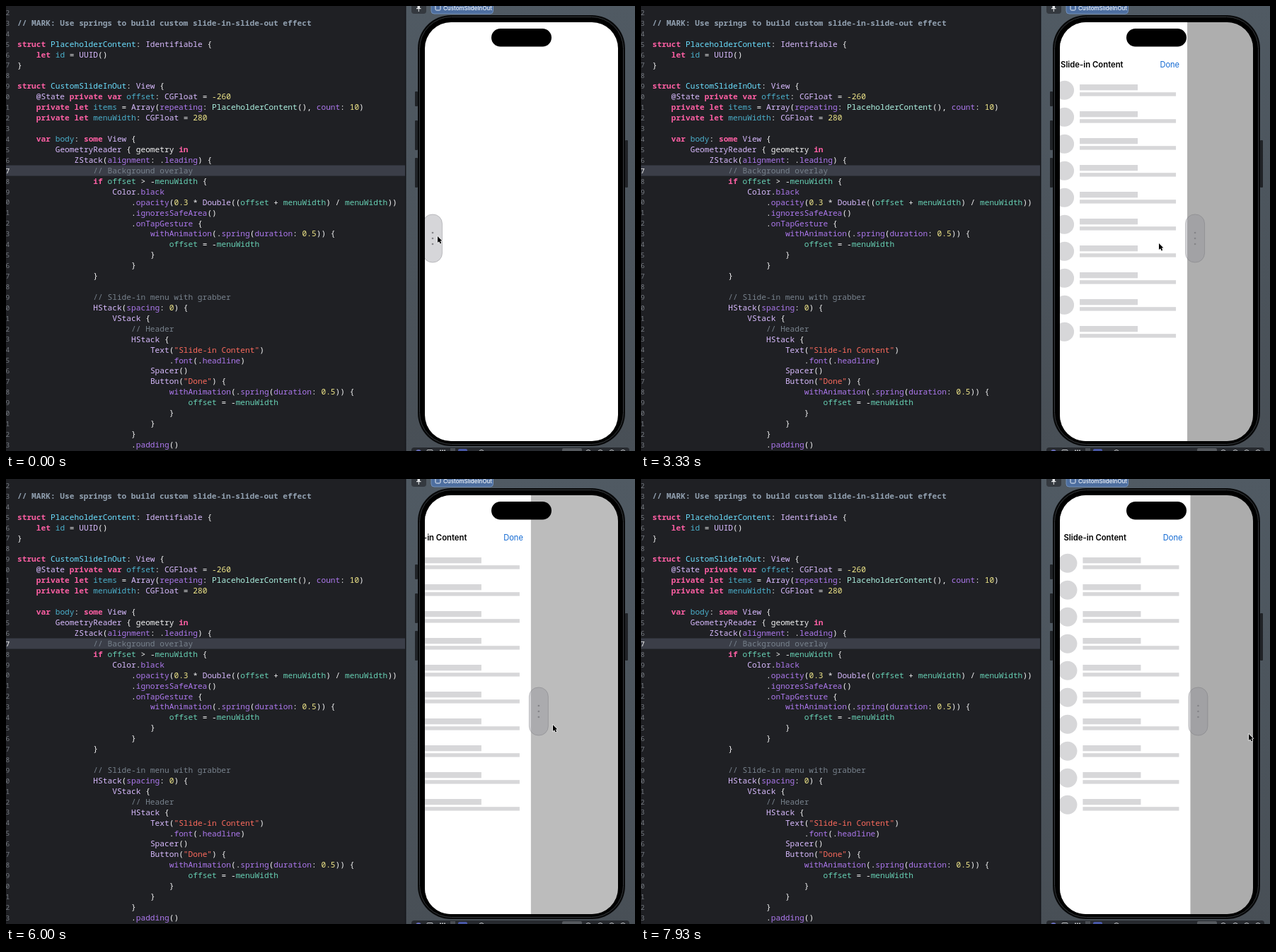
Animation, 889 px wide and 630 px high, one loop 8000 ms. Source, as an HTML page with a canvas:

```html
<!DOCTYPE html>
<html lang="en">
<head>
<meta charset="utf-8">
<title>Slide-in menu</title>
<style>
  html, body { margin: 0; width: 100%; height: 100%; overflow: hidden; background: #1f2024; }
  canvas { display: block; }
</style>
</head>
<body>
<canvas id="stage" width="889" height="630"></canvas>
<script>
const ctx = document.getElementById('stage').getContext('2d');
const LOOP = 8000, CLOSED = 592, OPEN = 782, OMEGA = 2 * Math.PI / 500;
const MONO = '"Noto Sans Mono", "DejaVu Sans Mono", monospace';
const SANS = 'Inter, Roboto, sans-serif';
const CHAR = 6.71, LINE = 14.925;

const code = `
// MARK: Use springs to build custom slide-in-slide-out effect

struct PlaceholderContent: Identifiable {
    let id = UUID()
}

struct CustomSlideInOut: View {
    @State private var offset: CGFloat = -260
    private let items = Array(repeating: PlaceholderContent(), count: 10)
    private let menuWidth: CGFloat = 280

    var body: some View {
        GeometryReader { geometry in
            ZStack(alignment: .leading) {
                // Background overlay
                if offset > -menuWidth {
                    Color.black
                        .opacity(0.3 * Double((offset + menuWidth) / menuWidth))
                        .ignoresSafeArea()
                        .onTapGesture {
                            withAnimation(.spring(duration: 0.5)) {
                                offset = -menuWidth
                            }
                        }
                }

                // Slide-in menu with grabber
                HStack(spacing: 0) {
                    VStack {
                        // Header
                        HStack {
                            Text("Slide-in Content")
                                .font(.headline)
                            Spacer()
                            Button("Done") {
                                withAnimation(.spring(duration: 0.5)) {
                                    offset = -menuWidth
                                }
                            }
                        }
                        .padding()`.split('\n');

// Syntax rules, first match wins: pattern, colour, weight
const rules = [
  [/\/\/ MARK.*/, '#92a1b1', 700],
  [/\/\/.*/, '#77818c', 500],
  [/"[^"]*"/, '#fc6a5d', 500],
  [/\b(?:struct|let|private|var|some|in|if)\b/, '#fc5fa3', 700],
  [/(?<=struct )\w+/, '#6bdfff', 500],
  [/(?<=(?:var|let) )\w+/, '#4bb0cc', 500],
  [/\b(?:offset|menuWidth)\b/, '#67d0b4', 500],
  [/-?\d[\d.]*/, '#f2e88a', 500],
  [/PlaceholderContent/, '#aef3e2', 500],
  [/@?[A-Z]\w*/, '#d9bbff', 500],
  [/withAnimation|(?<=\.)[a-z]\w*|[a-z]\w*(?=:)/, '#ad78ee', 500],
  [/[^\s\w]+?|\w+/, '#f4f4f5', 500]
];
const tokenizer = new RegExp(rules.map(r => `(${r[0].source})`).join('|'), 'g');

// Each cycle: drag start, release, tap on the overlay
const cycles = [[60, 500, 1770], [2650, 3060, 4283], [5480, 5920, 7910]];
// Pointer path: time, x, y
const path = [
  [60, 610, 326], [500, 730, 336], [1150, 821, 351], [1770, 821, 351],
  [2450, 610, 330], [2650, 610, 330], [3060, 732, 336], [3340, 732, 336],
  [4050, 828, 349], [4530, 828, 349], [5250, 610, 332], [5480, 610, 332],
  [5920, 745, 346], [6000, 773, 348], [6500, 835, 358], [6800, 835, 358],
  [7400, 859, 361]
];

const spring = ms => (1 + OMEGA * ms) * Math.exp(-OMEGA * ms);

function pointer(t) {
  const i = path.findIndex(p => p[0] > t);
  if (i === 0) return path[0].slice(1);
  if (i < 0) return path[path.length - 1].slice(1);
  const [a, b] = [path[i - 1], path[i]];
  const u = (t - a[0]) / (b[0] - a[0]), s = u * u * (3 - 2 * u);
  return [1, 2].map(k => a[k] + (b[k] - a[k]) * s);
}

const draggedEdge = t => CLOSED + pointer(t)[0] - 610;

function menuEdge(t) {
  const cycle = cycles.filter(c => c[0] <= t).pop();
  if (!cycle) return CLOSED;
  const [, release, tap] = cycle;
  if (t < release) return draggedEdge(t);
  if (t < tap) return OPEN - (OPEN - draggedEdge(release)) * spring(t - release);
  return CLOSED + (OPEN - CLOSED) * spring(t - tap);
}

function rect(x, y, w, h, color) {
  ctx.fillStyle = color;
  ctx.fillRect(x, y, w, h);
}

function round(x, y, w, h, r, fill, stroke) {
  ctx.beginPath();
  ctx.roundRect(x, y, w, h, r);
  if (fill) { ctx.fillStyle = fill; ctx.fill(); }
  if (stroke) { ctx.strokeStyle = stroke; ctx.lineWidth = 1; ctx.stroke(); }
}

function dot(x, y, r, color) {
  ctx.beginPath();
  ctx.arc(x, y, r, 0, 7);
  ctx.fillStyle = color;
  ctx.fill();
}

function text(str, x, y, font, color, align = 'left') {
  ctx.font = font;
  ctx.fillStyle = color;
  ctx.textAlign = align;
  ctx.fillText(str, x, y);
}

function drawEditor() {
  rect(0, 0, 564, 630, '#1f2024');
  rect(0, 225.5, 564, 15, '#3b3e48');
  code.forEach((line, i) => {
    const y = 13 + i * LINE, current = i === 15;
    text(i + 22, 5.2, y - 0.2, `500 9.5px ${MONO}`, current ? '#fff' : '#777b82', 'right');
    for (const m of line.matchAll(tokenizer)) {
      const [, color, weight] = rules[m.slice(1).findIndex(g => g !== undefined)];
      text(m[0], 16 + m.index * CHAR, y, `${weight} 11.18px ${MONO}`, color);
    }
  });
}

function drawPanel() {
  const shade = ctx.createLinearGradient(0, 0, 0, 630);
  shade.addColorStop(0, '#505a63');
  shade.addColorStop(1, '#484f56');
  rect(564, 0, 325, 630, shade);
  rect(564, 0, 1.5, 630, '#15161a');

  round(573, -10, 21, 21, 4, '#34393f');
  rect(581.5, 0, 3.5, 3, '#e4e6e8');
  rect(580, 3, 6.5, 1.2, '#e4e6e8');
  rect(582.8, 4, 1, 4, '#e4e6e8');
  round(601, -10, 87.5, 21, 4, '#4d6e9f', '#7190bb');
  round(607, -1.5, 7, 7.5, 1.5, null, '#edf2fa');
  text('CustomSlideInOut', 618, 6, `500 8px ${SANS}`, '#f4f7fc');

  round(573, 625, 308, 20, 4, '#272a2f');
  rect(628, 626, 7, 4, '#4a4e54');
  round(639, 627, 13, 9, 2, '#4857a5');
  round(786, 626, 28, 9, 2, '#55595e');
  dot(583, 632, 4, '#6a6fc0');
  round(595, 628.5, 8, 8, 1, null, '#c8cacd');
  for (let x = 613; x < 622; x += 3) rect(x, 628.5, 2, 2, '#b5b7ba');
  for (const x of [672, 823, 840, 856, 872]) round(x - 3.5, 628.5, 7, 7, 3.5, null, '#c8cacd');
}

function drawPhone() {
  for (const [x, y, h] of [[578, 121, 21], [578, 162, 42], [578, 215, 42], [875, 190, 67]])
    round(x, y, 4, h, 1, '#202327');
  round(582, 13, 293, 610, 47, '#08090a');
  round(584.5, 15.5, 288, 605, 45, '#000', '#35383b');
  round(592, 23, 273, 593, 37, '#fff');
}

function drawMenu(edge) {
  const gray = '#d7d7d9';
  rect(CLOSED, 22, edge - CLOSED, 595, '#fff');
  text('Slide-in Content', edge - 179, 87, `600 11.3px ${SANS}`, '#000');
  text('Done', edge - 11, 87, `400 11.1px ${SANS}`, '#1068d2', 'right');
  for (let i = 0; i < 10; i++) {
    const y = 119.3 + i * 38;
    dot(edge - 173.5, y, 13.5, gray);
    rect(edge - 152, y - 8.3, 82, 8.3, gray);
    rect(edge - 152, y + 2.9, 136, 5.4, gray);
  }
}

function drawGrabber(edge) {
  round(edge - 2.5, 295, 27, 68, 13, 'rgba(142,142,150,.36)', 'rgba(110,110,116,.35)');
  for (const y of [321, 329, 337]) dot(edge + 11, y, 1.35, '#858589');
}

function drawPointer(x, y) {
  const shape = [[0, 0], [0, 9], [2.1, 7.2], [3.6, 10.4], [5.2, 9.7], [3.8, 6.6], [6.4, 6.4]];
  ctx.beginPath();
  for (const [dx, dy] of shape) ctx.lineTo(x + dx, y + dy);
  ctx.closePath();
  ctx.lineJoin = 'round';
  ctx.lineWidth = 1.3;
  ctx.strokeStyle = '#fff';
  ctx.stroke();
  ctx.fillStyle = '#000';
  ctx.fill();
}

function draw(t) {
  const edge = menuEdge(t);
  drawEditor();
  drawPanel();
  drawPhone();
  ctx.save();
  ctx.beginPath();
  ctx.roundRect(592, 23, 273, 593, 37);
  ctx.clip();
  const openness = (edge - CLOSED) / (OPEN - CLOSED);
  rect(592, 22, 274, 595, `rgba(0,0,0,${0.335 * openness})`);
  drawMenu(edge);
  drawGrabber(edge);
  ctx.restore();
  round(686, 32, 85, 25.5, 12.75, '#000');
  drawPointer(...pointer(t));
}

const start = performance.now();
function frame() {
  draw((performance.now() - start) % LOOP);
  requestAnimationFrame(frame);
}
frame();
</script>
</body>
</html>
```
